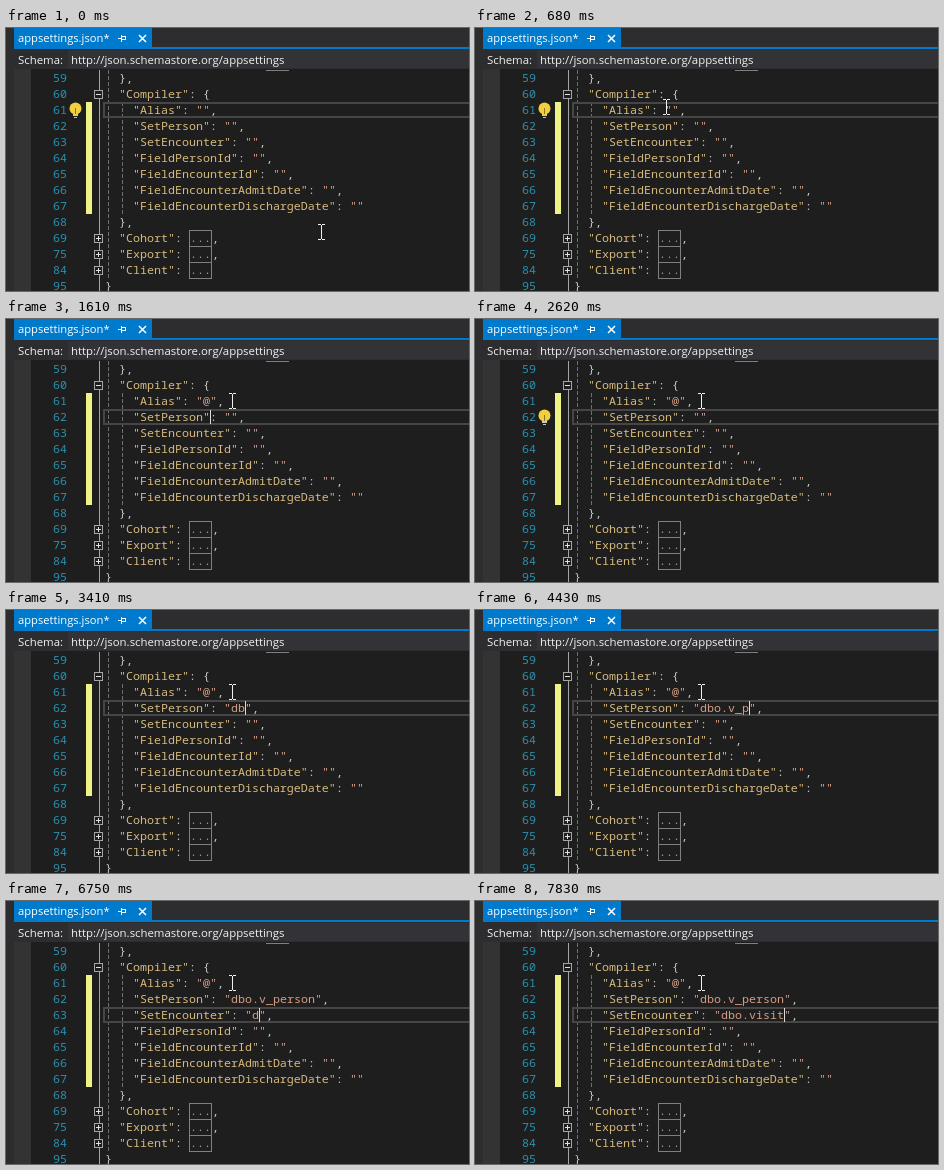
These frames come from a looping animation (463x263 px, 8000 ms). An HTML page with a canvas:

```html
<!DOCTYPE html>
<html lang="en">
<head>
<meta charset="utf-8">
<title>Editing appsettings.json</title>
<style>
  html, body { margin: 0; width: 100%; height: 100%; overflow: hidden; background: #1e1e1e; }
  canvas { display: block; }
</style>
</head>
<body>
<canvas id="stage" width="463" height="263"></canvas>
<script>
const ctx = document.getElementById('stage').getContext('2d');
const LOOP = 8000, IDLE = 460;
const CHAR = 7, ROW = 16, TOP = 42, LEFT = 99;
const MONO = '11.667px "Noto Sans Mono", monospace';
const UI = '"Open Sans", sans-serif';

// Typing speeds up between key points [time, characters typed].
const alias = { row: 2, column: null, text: '@', keys: [[1150, 1]] };
const person = { row: 3, column: 14, text: 'dbo.v_person', keys: [[2940, 1], [4430, 7], [4810, 12]] };
const encounter = { row: 4, column: 17, text: 'dbo.visit', keys: [[6750, 1], [7430, 5], [7750, 9]] };
const edits = [alias, person, encounter];

// Arrow keys: [time, row, column]
const moves = [[-IDLE, 2, 10], [1610, 3, 11], [1780, 3, 16], [2010, 3, 15], [2160, 3, 14],
  [5440, 4, 19], [5520, 4, 18], [5670, 4, 17]];
const mousePath = [[70, 315, 204], [400, 181, 80], [530, 191, 79], [680, 191, 79], [840, 226, 82]];

// Linear interpolation between key points, held at both ends.
function between(keys, t) {
  const next = keys.findIndex(key => key[0] > t);
  if (next < 1) return keys.at(next).slice(1);
  const a = keys[next - 1], b = keys[next], f = (t - a[0]) / (b[0] - a[0]);
  return a.slice(1).map((v, i) => v + (b[i + 1] - v) * f);
}

function typed({ text, keys }, t) {
  return t < keys[0][0] ? '' : text.slice(0, Math.floor(between(keys, t)[0] + 1e-6));
}

// Where the caret stands, and whether the editor has been idle long enough to show the bulb.
function caretState(t) {
  let [time, row, column] = moves.findLast(move => move[0] <= t);
  const edit = edits.find(e => e.row === row && e.keys[0][0] <= t);
  if (edit) {
    time = Math.min(t, edit.keys.at(-1)[0]);
    column = edit.column && edit.column + typed(edit, t).length;
  }
  return { row, column, idle: t - time >= IDLE };
}

function rect(x, y, w, h, color) {
  ctx.fillStyle = color;
  ctx.fillRect(x, y, w, h);
}

function box(x, y, w, h, color) {
  ctx.strokeStyle = color;
  ctx.lineWidth = 1;
  ctx.strokeRect(x + .5, y + .5, w - 1, h - 1);
}

function label(text, x, y, color, font) {
  ctx.font = font;
  ctx.fillStyle = color;
  ctx.fillText(text, x, y);
}

function dashes(x, y0, y1) {
  for (let y = y0; y < y1; y += 6) rect(x, y, 1, Math.min(4, y1 - y), '#707070');
}

function header() {
  rect(0, 0, 463, 263, '#2d2d30');
  rect(8, 0, 138, 19, '#007acc');
  rect(8, 19, 455, 2, '#007acc');
  rect(62, 22, 401, 18, '#333337');
  rect(8, 41, 17, 222, '#333333');
  rect(25, 41, 438, 222, '#1e1e1e');
  label('appsettings.json*', 12, 14, '#fff', '11.2px ' + UI);
  label('Schema:', 12, 36, '#f1f1f1', '11.4px ' + UI);
  label('http://json.schemastore.org/appsettings', 65, 36, '#f1f1f1', '11.4px ' + UI);
  // pin and close
  rect(112, 10, 3, 1, '#fff');
  rect(115, 7, 1, 7, '#fff');
  box(115, 8, 5, 4, '#fff');
  rect(116, 11, 4, 1, '#fff');
  ctx.beginPath();
  ctx.moveTo(133, 7); ctx.lineTo(140, 14);
  ctx.moveTo(140, 7); ctx.lineTo(133, 14);
  ctx.lineWidth = 1.5;
  ctx.stroke();
}

function fold(row, closed) {
  const y = TOP + row * ROW + 4;
  rect(88, y, 9, 9, '#1e1e1e');
  box(88, y, 9, 9, '#a5a5a5');
  rect(90, y + 4, 5, 1, '#e0e0e0');
  if (closed) rect(92, y + 2, 1, 5, '#e0e0e0');
}

function codeLine([number, indent, text], row) {
  const baseline = TOP + row * ROW + 12;
  let x = LEFT + indent * 2 * CHAR, strings = 0;
  label(number, 47, baseline, '#2b91af', MONO);
  for (const part of text.match(/"[^"]*"|\.{3}|[^".]+/g)) {
    let color = '#c8c8c8';
    if (part[0] === '"') color = strings++ ? '#d69d85' : '#d7ba7d';
    if (part === '...') {
      box(x, TOP + row * ROW, 23, ROW + 1, '#808080');
      color = '#a0a0a0';
    }
    label(part, x + (part === '...'), baseline, color, MONO);
    x += part.length * CHAR + 2 * (part === '...');
  }
}

function bulb(row) {
  const y = TOP + row * ROW;
  ctx.fillStyle = '#f2cf3e';
  ctx.beginPath();
  ctx.arc(69.5, y + 6.5, 6, 0, 7);
  ctx.fill();
  rect(67, y + 10, 5, 3, '#f2cf3e');
  rect(69, y + 6, 1, 6, '#8a7420');
  rect(67, y + 13, 5, 1, '#c8c8c8');
  rect(68, y + 15, 3, 1, '#c8c8c8');
}

function pointer(x, y) {
  x = Math.round(x);
  y = Math.round(y);
  rect(x, y - 7, 1, 14, '#f0f0f0');
  for (const end of [y - 8, y + 7]) {
    rect(x - 3, end, 3, 1, '#f0f0f0');
    rect(x + 1, end, 3, 1, '#f0f0f0');
  }
}

function draw(t) {
  const lines = [
    [59, 1, '},'],
    [60, 1, '"Compiler": {'],
    [61, 2, `"Alias": "${typed(alias, t)}",`],
    [62, 2, `"SetPerson": "${typed(person, t)}",`],
    [63, 2, `"SetEncounter": "${typed(encounter, t)}",`],
    [64, 2, '"FieldPersonId": "",'],
    [65, 2, '"FieldEncounterId": "",'],
    [66, 2, '"FieldEncounterAdmitDate": "",'],
    [67, 2, '"FieldEncounterDischargeDate": ""'],
    [68, 1, '},'],
    [69, 1, '"Cohort": ...,'],
    [75, 1, '"Export": ...,'],
    [84, 1, '"Client": ...'],
    [95, 0, '}'],
  ];
  const { row, column, idle } = caretState(t);
  const lineTop = TOP + row * ROW;

  header();
  rect(260, 42, 23, 1, '#808080');
  rect(80, 74, 6, 112, '#eff284');
  rect(93, 42, 1, 221, '#a5a5a5');
  dashes(102, 42, 250);
  dashes(116, 74, 186);
  ctx.strokeStyle = '#464646';
  ctx.lineWidth = 2;
  ctx.strokeRect(98, lineTop + 1, 380, ROW - 2);
  fold(1, false);
  [10, 11, 12].forEach(r => fold(r, true));
  lines.forEach(codeLine);
  if (idle) bulb(row);
  else if (column) rect(LEFT + (4 + column) * CHAR, lineTop + 1, 1, 14, '#dcdcdc');
  pointer(...between(mousePath, t));
}

function tick() {
  draw(performance.now() % LOOP);
  requestAnimationFrame(tick);
}
tick();
</script>
</body>
</html>
```
